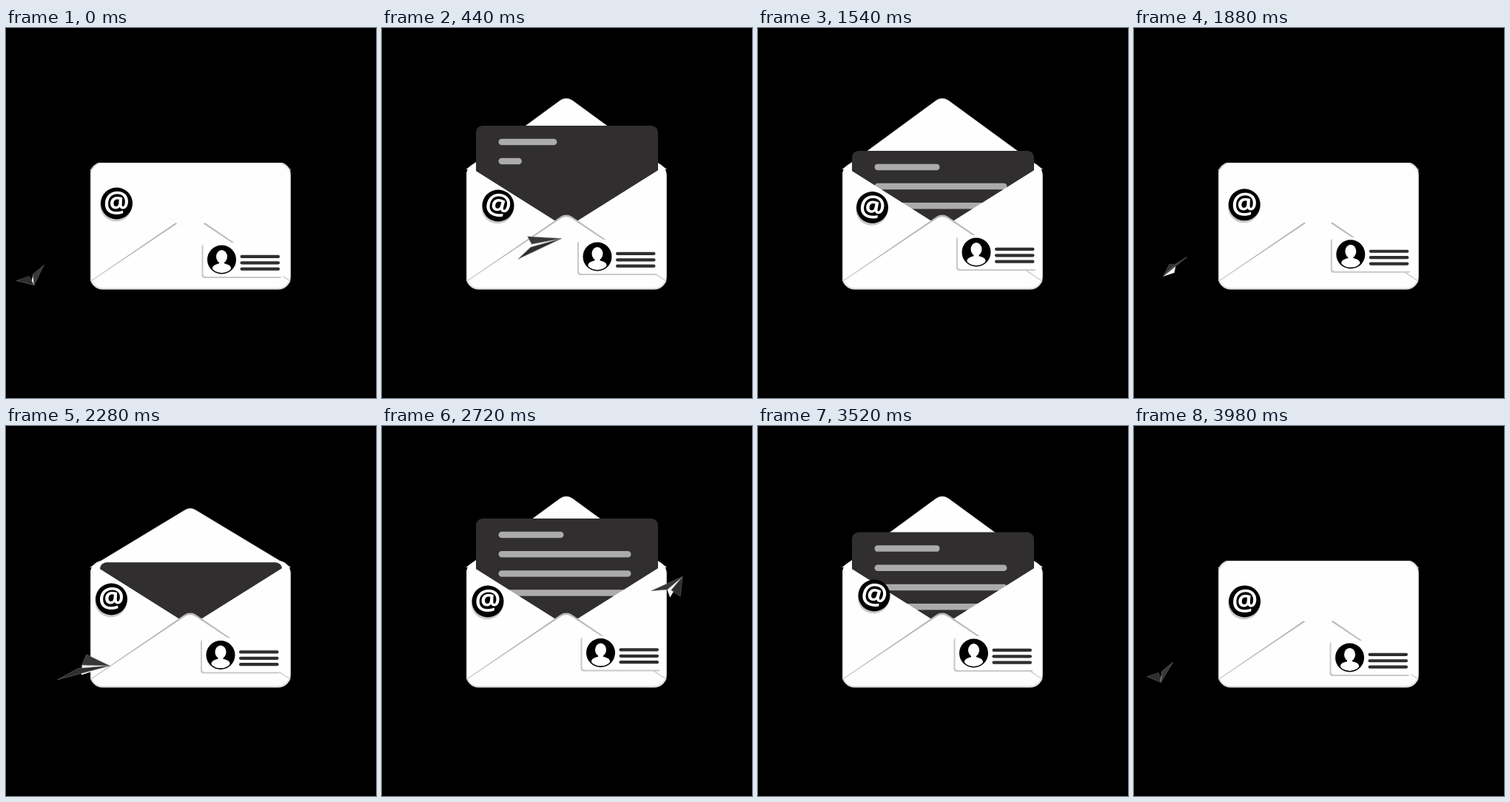
Recreate the animation shown at these times as an HTML page with a canvas. Size 500 px wide and 500 px high, loop 4 s.

```html
<!DOCTYPE html>
<html lang="en">
<head>
<meta charset="utf-8">
<title>Mail</title>
<style>
html, body { margin: 0; width: 100%; height: 100%; overflow: hidden; background: #000; }
canvas { display: block; width: 100vw; height: 100vh; }
</style>
</head>
<body>
<canvas id="stage" width="500" height="500"></canvas>
<script>
const ctx = document.getElementById('stage').getContext('2d');
const LOOP = 4000, CYCLE = 2000;
const INK = '#302e2f', PAPER = '#fefefe', EDGE = '#dcdcdc', SHADE = '#c9c9c9', RULE = '#acabac';
const LEFT = 114, RIGHT = 384.5, TOP = 182, MID = 249;

// Resting points of the floating parts: time, badge x,y, portrait x,y
const DRIFT = [
  [0, 149.5, 237, 291.5, 313],
  [440, 157, 240, 291, 309],
  [1540, 154.5, 242.5, 295, 303],
  [2280, 142.5, 234, 290, 309.5],
  [2720, 143, 237, 295.5, 306.5],
  [3520, 157, 229, 291.5, 307]
];

const mix = (a, b, p) => a + (b - a) * p;
const between = (a, b, p) => a.map((v, i) => mix(v, b[i], p));
const add = (a, b, k = 1) => a.map((v, i) => v + b[i] * k);
const span = (t, a, b) => Math.min(1, Math.max(0, (t - a) / (b - a)));
const smooth = p => p * p * (3 - 2 * p);

function expo(p) {
  if (p <= 0 || p >= 1) return p;
  return p < 0.5 ? 2 ** (20 * p - 11) : 1 - 2 ** (9 - 20 * p);
}

// Rises during one span of time and falls back during another
const pulse = (t, up, down) => expo(span(t, ...up)) - expo(span(t, ...down));

function drift(t) {
  const i = DRIFT.findLastIndex(row => row[0] <= t);
  const a = DRIFT[i], b = DRIFT[(i + 1) % DRIFT.length];
  const p = smooth(span(t, a[0], b[0] || LOOP));
  return between(a, b, p).slice(1);
}

function poly(fill, ...pts) {
  ctx.beginPath();
  pts.forEach(([x, y]) => ctx.lineTo(x, y));
  ctx.closePath();
  ctx.fillStyle = fill;
  ctx.fill();
}

function box(fill, x, y, w, h, r) {
  ctx.beginPath();
  ctx.roundRect(x, y, w, h, r);
  ctx.fillStyle = fill;
  ctx.fill();
}

function oval(fill, x, y, rx, ry = rx) {
  ctx.beginPath();
  ctx.ellipse(x, y, rx, ry, 0, 0, Math.PI * 2);
  ctx.fillStyle = fill;
  ctx.fill();
}

function bar(color, x1, x2, y, width) {
  ctx.beginPath();
  ctx.moveTo(x1 + width / 2, y);
  ctx.lineTo(Math.max(x1 + width / 2, x2 - width / 2), y);
  ctx.lineCap = 'round';
  outline(color, width);
}

function outline(color, width) {
  ctx.strokeStyle = color;
  ctx.lineWidth = width;
  ctx.stroke();
}

function peak(fill, base, tip) {
  ctx.beginPath();
  ctx.moveTo(LEFT, base);
  ctx.arcTo(MID, tip, RIGHT, base, 14);
  ctx.lineTo(RIGHT, base);
  ctx.fillStyle = fill;
  ctx.fill();
}

function envelopePath() {
  ctx.beginPath();
  ctx.roundRect(LEFT, TOP, RIGHT - LEFT, 170.5, 17);
}

function flap(lift) {
  if (lift < 0) box(PAPER, LEFT + 0.5, TOP + 0.5, RIGHT - LEFT - 1, 16, [17, 17, 0, 0]);
  peak(PAPER, 191, 191 - 99 * lift);
  outline(lift < 0 ? '#f9f9f9' : EDGE, 0.8);
}

function letter(t) {
  const top = 184.5 - 59.5 * pulse(t, [222, 582], [1382, 1678]);
  box(INK, 127, top, 246, 150, 9);
  for (let i = 0; i < 4; i++) {
    const p = smooth(span(t, 320 + 80 * i, 470 + 80 * i));
    const end = i ? 336.5 : 245.5;
    if (p > 0) bar(RULE, 157.5, mix(157.5, end, p), top + 22 + 26.2 * i, 8.5);
  }
}

function front() {
  ctx.save();
  envelopePath();
  ctx.clip();
  for (const x of [LEFT, RIGHT]) poly(PAPER, [x, 185], [MID, 270], [x, 354]);
  peak('#b9b9b9', 342, 249.5);
  peak(PAPER, 343, 252.5);
  ctx.fillRect(LEFT, 342.5, 271, 12);
  ctx.restore();
}

function rim(top) {
  ctx.save();
  ctx.beginPath();
  ctx.rect(LEFT, top, RIGHT - LEFT, 200);
  ctx.clip();
  envelopePath();
  outline(EDGE, 2);
  ctx.restore();
}

function badge(x, y) {
  oval(SHADE, x - 0.8, y + 3, 21.5);
  oval('#000', x, y, 21.5);
  ctx.save();
  ctx.translate(x, y);
  ctx.rotate(Math.max(0, x - 149) * 1.5 * Math.PI / 180);
  ctx.font = '700 39px "Open Sans", "Noto Sans", sans-serif';
  ctx.textAlign = 'center';
  ctx.fillStyle = '#fff';
  ctx.fillText('@', 0, 12);
  ctx.restore();
}

function card(x, y) {
  box(SHADE, x - 27, y - 21, 108, 46, 4);
  box('#fff', x - 25, y - 23, 110, 46, 4);
  oval('#000', x, y, 19.5);
  ctx.save();
  ctx.beginPath();
  ctx.arc(x, y, 18, 0, Math.PI * 2);
  ctx.clip();
  oval('#fff', x, y - 4, 7.5, 9);
  ctx.fillRect(x - 3.5, y + 1, 7, 6);
  oval('#fff', x, y + 11.5, 12.5, 6.5);
  ctx.restore();
  for (let i = 0; i < 3; i++) bar(INK, x + 25, x + 78.5, y - 4.1 + 8.4 * i, 4.2);
}

// The plane circles the envelope once per cycle and turns with its orbit
function plane(t) {
  const a = t / CYCLE * Math.PI * 2;
  const wave = (c, s, d = 0) => c * Math.cos(a) + s * Math.sin(a) + d * Math.sin(2 * a);
  const tail = [242 + wave(-209.5, -7.5, -14), 253 + wave(78, 30)];
  const ahead = [wave(5.5, 48, 11), wave(16.5, -16)];
  const side = [wave(-18.5, 0, -8), wave(10.5, 13.5)];

  const nose = add(tail, ahead);
  const fold = add(tail, ahead, 0.25);
  const right = add(tail, side), left = add(tail, side, -1);
  ctx.lineJoin = 'round';
  poly('#f4f4f4', nose, between(fold, left, 0.15), add(fold, [0, 11]));
  poly('#2f2d2e', right, nose, between(fold, right, 0.12));
  outline('#777', 0.5);
  poly('#393738', left, nose, between(fold, left, 0.15));
  outline('#777', 0.5);
}

function draw(now) {
  const t = now % LOOP, c = t % CYCLE;
  const behind = c > CYCLE / 2;
  const lift = mix(-0.85, 1, pulse(c, [94, 394], [1637, 1937]));
  const [bx, by, cx, cy] = drift(t);

  ctx.fillStyle = '#000';
  ctx.fillRect(0, 0, 500, 500);
  if (behind) plane(c);
  envelopePath();
  ctx.fillStyle = PAPER;
  ctx.fill();
  if (lift >= 0) flap(lift);
  letter(c);
  front();
  if (lift < 0) flap(lift);
  rim(lift < 0 ? TOP : 196);
  badge(bx, by);
  card(cx, cy);
  if (!behind) plane(c);
}

const begin = performance.now();
function tick() {
  draw(Math.floor((performance.now() - begin) / 20) * 20);
  requestAnimationFrame(tick);
}
tick();
</script>
</body>
</html>
```
